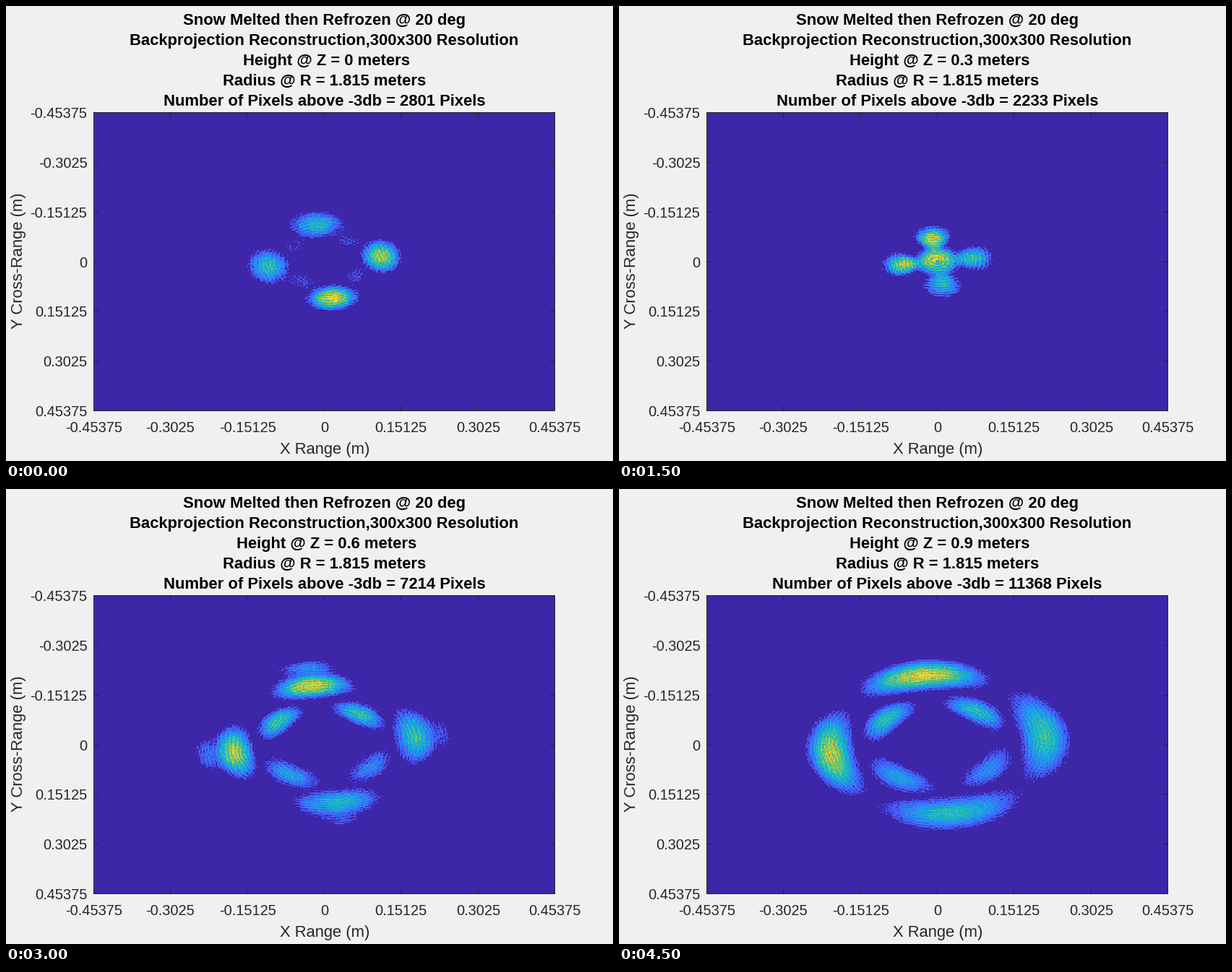
Recreate the animation shown at these times as a matplotlib script. Size 840x630 px, loop 5 s.

```python
import numpy as np
import matplotlib.pyplot as plt
from matplotlib.animation import FuncAnimation
from matplotlib.colors import LinearSegmentedColormap

W, H, DPI = 840, 630, 100
LEFT, RIGHT, TOP, BOTTOM = 121.5, 759.5, 147.5, 560.5
N = 300
INK = (0.15, 0.15, 0.15)
COUNTS = [2801, 1434, 962, 2233, 3876, 6124, 7214, 8482, 10998, 11368]

plt.rcParams["font.family"] = "Liberation Sans"

parula = LinearSegmentedColormap.from_list("heat", [
    (0.2422, 0.1504, 0.6603), (0.2810, 0.3228, 0.9579),
    (0.1786, 0.5289, 0.9682), (0.0689, 0.6948, 0.8394),
    (0.2161, 0.7843, 0.5923), (0.6720, 0.7793, 0.2227),
    (0.9970, 0.7659, 0.2199), (0.9769, 0.9839, 0.0805)])

# Grid cells measured from the centre of the plot.
U, V = np.meshgrid(np.arange(N) + 0.5 - N / 2, np.arange(N) + 0.5 - N / 2)
R, THETA = np.hypot(U, V), np.arctan2(V, U)

# Key heights; a negative radius puts each lobe on the opposite side.
KEYS = [0, .1, .3, .5, .7, .9]
OUTER_R = [-37, -10, 22, 49, 70, 70]
OUTER_GAIN = [.9, .7, .7, 1, .9, 1]
INNER_R = [-25, -18, 4, 34, 42, 42]
INNER_GAIN = [.06, .2, .6, .45, .95, .65]
FAR_GAIN = [0, 0, 0, .4, .4, 0]

TURN = np.radians(-8)
BASE = 0.5                                   # envelope at the rim of a lobe
OUTER = np.array([.47, .41, .70, .80])       # right, bottom, left, top
INNER = np.array([.28, .42, .68, .65])       # the diagonals between them


def ring(levels, radius, depth, spread, turn):
    """Four lobes a quarter turn apart, bent along one circle."""
    total = np.zeros((N, N))
    r = abs(radius)
    for i, level in enumerate(levels):
        if level < 0.01:
            continue
        angle = turn + i * np.pi / 2 + (np.pi if radius < 0 else 0)
        gap = np.angle(np.exp(1j * (THETA - angle)))
        q = ((R - r) / depth) ** 2 + (r * gap / max(spread * r, 9)) ** 2
        peak = BASE + level
        fall = max(np.log(peak / BASE), 0.45)
        total += (peak * np.exp(-fall * q)) ** 4
    return total


def envelope(z):
    def key(values):
        return np.interp(z, KEYS, values)

    spread = np.interp(z, [.7, .8], [.45, .58])
    depth = np.interp(z, [.7, .8], [13, 14.5])
    far = np.interp(z, [.5, .7], [82, 72])
    total = (ring(OUTER * key(OUTER_GAIN), key(OUTER_R), depth, spread, TURN)
             + ring(INNER * key(INNER_GAIN), key(INNER_R), 9.5, 0.5,
                    TURN + np.pi / 4)
             + ring(OUTER ** 3 * key(FAR_GAIN), far, 8, 0.22, TURN))
    return total ** 0.25


def wave(rng, length):
    a, phase = rng.uniform(0, 2 * np.pi, 2)
    return np.cos(2 * np.pi * (U * np.cos(a) + V * np.sin(a)) / length + phase)


def speckle(k):
    """Interference fringes around the centre, cross waves and grain."""
    rng = np.random.default_rng(40 + k)
    warp = sum(wave(rng, s) for s in (14, 19, 26, 35))
    fringes = np.cos(2 * np.pi * R / 2.5 + 0.9 * warp)
    hatch = sum(wave(rng, 2.3) for _ in range(4)) / 2
    grain = rng.uniform(-1, 1, (N, N))
    return 0.10 * fringes + 0.06 * hatch + 0.10 * grain


def heat(k):
    """Levels above the cut that leaves exactly the counted cells lit."""
    v = envelope(k / 10) * (1 + speckle(k))
    ranked = np.sort(v, axis=None)
    cut, peak = ranked[-COUNTS[k]], ranked[-12]
    level = 0.10 + 0.82 * (v - cut) / (peak - cut)
    return np.where(v >= cut, np.clip(level, 0, 1), 0)


MAPS = [heat(k) for k in range(len(COUNTS))]

fig = plt.figure(figsize=(W / DPI, H / DPI), dpi=DPI, facecolor="#f0f0f0")
ax = fig.add_axes([0, 0, 1, 1])
img = ax.imshow(MAPS[0], cmap=parula, vmin=0, vmax=1, interpolation="nearest",
                extent=(LEFT, RIGHT, BOTTOM, TOP), aspect="auto")
ax.set_xlim(0, W)
ax.set_ylim(H, 0)
ax.axis("off")


def label(x, y, s, px, ha="center", color=INK, **kw):
    return ax.text(x, y, s, fontsize=px * 72 / DPI, ha=ha, va="baseline",
                   color=color, **kw)


def line(xs, ys):
    ax.plot(xs, ys, color=INK, lw=72 / DPI, snap=False,
            solid_capstyle="projecting", solid_joinstyle="miter")


line([LEFT, RIGHT, RIGHT, LEFT, LEFT], [TOP, TOP, BOTTOM, BOTTOM, TOP])
TICK = 6
for i in range(7):
    name = f"{(i - 3) * 0.15125:g}"
    x = np.floor(LEFT + i * (RIGHT - LEFT) / 6) + 0.5
    y = np.floor(TOP + i * (BOTTOM - TOP) / 6) + 0.5
    line([x, x], [BOTTOM, BOTTOM - TICK])
    line([x, x], [TOP, TOP + TICK])
    line([LEFT, LEFT + TICK], [y, y])
    line([RIGHT, RIGHT - TICK], [y, y])
    label(x, 590, name, 20)
    label(112.5, y + 7.5, name, 20, ha="right")

label(441, 620, "X Range (m)", 22)
label(23, 353, "Y Cross-Range (m)", 22, rotation=90, rotation_mode="anchor")


def heading(row, s="", x=440.5):
    return label(x, 26 + 28 * row, s, 22, color="black", weight="bold")


heading(0, "Snow Melted then Refrozen @ 20 deg")
heading(1, "Backprojection Reconstruction,300x300 Resolution")
height = heading(2, x=443.5)
heading(3, "Radius @ R = 1.815 meters")
pixels = heading(4)


def update(k):
    img.set_data(MAPS[k])
    height.set_text(f"Height @ Z = {k / 10:g} meters")
    pixels.set_text(f"Number of Pixels above -3db = {COUNTS[k]} Pixels")
    return img, height, pixels


anim = FuncAnimation(fig, update, frames=len(COUNTS), interval=500,
                     repeat=True, repeat_delay=0, blit=False)
plt.show()
```
